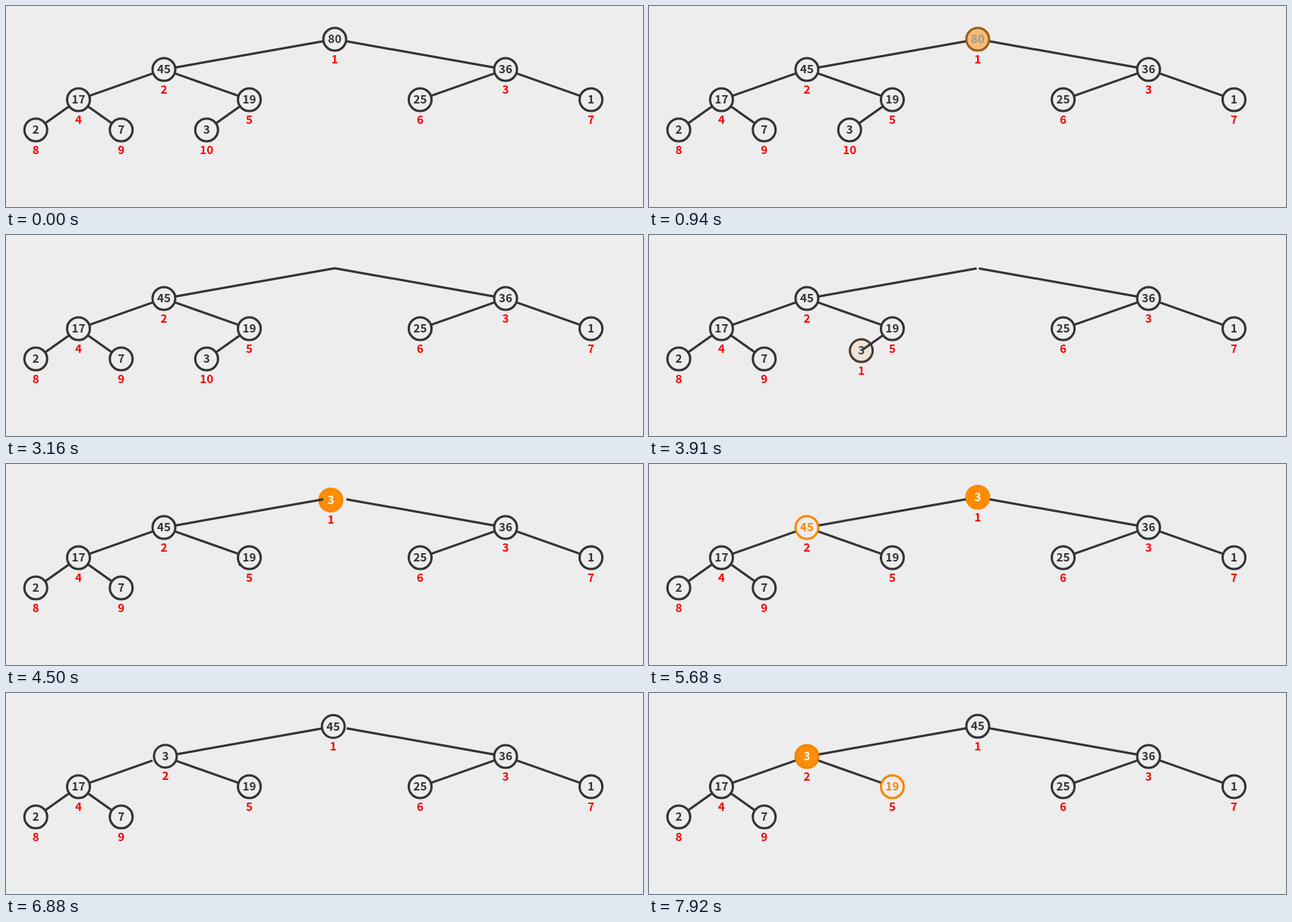
An HTML page for the animation above (8000 ms loop, 839 by 266 pixels).

```html
<!DOCTYPE html>
<html lang="en">
<head>
<meta charset="utf-8">
<title>Binary heap: extract max</title>
<style>
  html, body { margin: 0; width: 100%; height: 100%; overflow: hidden; background: #ededed; }
  svg { display: block; width: 839px; height: 266px; }
  text {
    font: 700 15.2px "Noto Sans CJK JP", "Noto Sans CJK SC", "Noto Sans CJK", "Open Sans", sans-serif;
    text-anchor: middle;
  }
  .index { fill: #f00; }
  line { stroke: #333; stroke-width: 3; }
</style>
</head>
<body>
<svg viewBox="0 0 839 266"><g id="discs"></g><g id="edges"></g><g id="texts"></g></svg>
<script>
const LOOP = 8000, RATE = 0.13, R = 16, FONT = 15.2;

// The picture advances in ticks of 150 ms, a few of them 140 ms.
const shortTicks = new Set([4, 8, 10, 13, 26, 28, 34, 49]);
const tickTimes = [500];
for (let k = 1; k <= 50; k++) {
  tickTimes.push(tickTimes[k - 1] + (shortTicks.has(k) ? 140 : 150));
}

// Starting ticks of the stages
const MARK_ROOT = -1.85, HIDE_ROOT = 5.8, DROP_ROOT = 18, LIFT_LAST = 20.82,
      COMPARE_1 = 28.5, SWAP = 36.3, COMPARE_2 = 44;

const GREY = [237, 237, 237], DARK = [51, 51, 51], ORANGE = [255, 138, 0], WHITE = [255, 255, 255];
const NORMAL = { ring: DARK, fill: GREY, ink: DARK };
const ACTIVE = { ring: ORANGE, fill: ORANGE, ink: WHITE };
const VISITED = { ring: ORANGE, fill: GREY, ink: ORANGE };

const lerp = (a, b, e) => a + (b - a) * e;
const mix = (a, b, e) => a.map((v, i) => lerp(v, b[i], e));
const rgb = c => `rgb(${c.map(Math.round)})`;

function progress(tick, start) {
  const p = Math.min(1, Math.max(0, (tick - start) * RATE));
  return p < 0.5 ? 4 * p ** 3 : 1 - 4 * (1 - p) ** 3;
}

// Position of a heap slot, counted from 1
function place(slot) {
  const depth = Math.floor(Math.log2(slot)), row = 2 ** depth;
  return [900 * (slot - row + 0.5) / row - 17, 44 + 40 * depth];
}

function add(parent, tag, cls) {
  const el = document.createElementNS("http://www.w3.org/2000/svg", tag);
  if (cls) el.setAttribute("class", cls);
  return document.getElementById(parent).appendChild(el);
}

function set(el, attrs) {
  for (const name in attrs) el.setAttribute(name, attrs[name]);
}

// Changes per value: start tick, new look, new slot
const changes = {
  80: [[MARK_ROOT, ACTIVE]],
  3: [[LIFT_LAST, ACTIVE, 1], [SWAP, NORMAL, 2], [COMPARE_2, ACTIVE]],
  45: [[COMPARE_1, VISITED], [SWAP, NORMAL, 1]],
  19: [[COMPARE_2, VISITED]]
};

const nodes = [80, 45, 36, 17, 19, 25, 1, 2, 7, 3].map((value, i) => ({
  value,
  slot: i + 1,
  steps: changes[value] || [],
  disc: add("discs", "circle"),
  text: add("texts", "text"),
  index: add("texts", "text", "index")
}));
nodes.forEach(n => n.text.textContent = n.value);

const edges = [];
for (let child = 2; child <= 10; child++) edges.push({ child, line: add("edges", "line") });

function drawNode(node, tick) {
  let { slot } = node, pos = place(slot), look = NORMAL;
  for (const [start, nextLook, nextSlot] of node.steps) {
    if (tick < start) break;
    const e = progress(tick, start);
    look = {
      ring: mix(look.ring, nextLook.ring, e),
      fill: mix(look.fill, nextLook.fill, e),
      ink: mix(look.ink, nextLook.ink, e)
    };
    if (nextSlot) {
      slot = nextSlot;
      pos = mix(pos, place(slot), e);
    }
  }
  const isOldRoot = node.value === 80;
  const hide = isOldRoot ? progress(tick, HIDE_ROOT) : 0;
  const visibility = isOldRoot && tick >= DROP_ROOT ? "hidden" : "visible";
  const style = `font-size:${lerp(FONT, 4.6, hide)}px`;
  const [x, y] = pos;
  set(node.disc, {
    cx: x, cy: y, r: 15 * (1 - hide), "stroke-width": 3 * (1 - hide),
    stroke: rgb(look.ring), fill: rgb(look.fill), visibility
  });
  set(node.text, { x, y: y + 5.33, fill: rgb(look.ink), style, visibility });
  set(node.index, { x, y: y + 31.8, style, visibility });
  node.index.textContent = slot;
}

function drawEdge({ child, line }, tick) {
  const parent = child >> 1;
  const [ax, ay] = place(parent), [bx, by] = place(child);
  const length = Math.hypot(bx - ax, by - ay);
  const rootGap = R * (1 - progress(tick, HIDE_ROOT) + progress(tick, LIFT_LAST));
  const from = (parent === 1 ? rootGap : R) / length;
  const gone = child === 10 ? progress(tick, LIFT_LAST) : 0;
  const to = lerp(1 - R / length, from, gone);
  set(line, {
    x1: lerp(ax, bx, from), y1: lerp(ay, by, from),
    x2: lerp(ax, bx, to), y2: lerp(ay, by, to),
    visibility: gone > 0.999 ? "hidden" : "visible"
  });
}

function draw(time) {
  const passed = tickTimes.filter(t => t <= time).length;
  const tick = passed ? passed - 1 : -10;
  nodes.forEach(n => drawNode(n, tick));
  edges.forEach(e => drawEdge(e, tick));
}

const begin = performance.now();
function loop() {
  draw((performance.now() - begin) % LOOP);
  requestAnimationFrame(loop);
}
loop();
</script>
</body>
</html>
```
